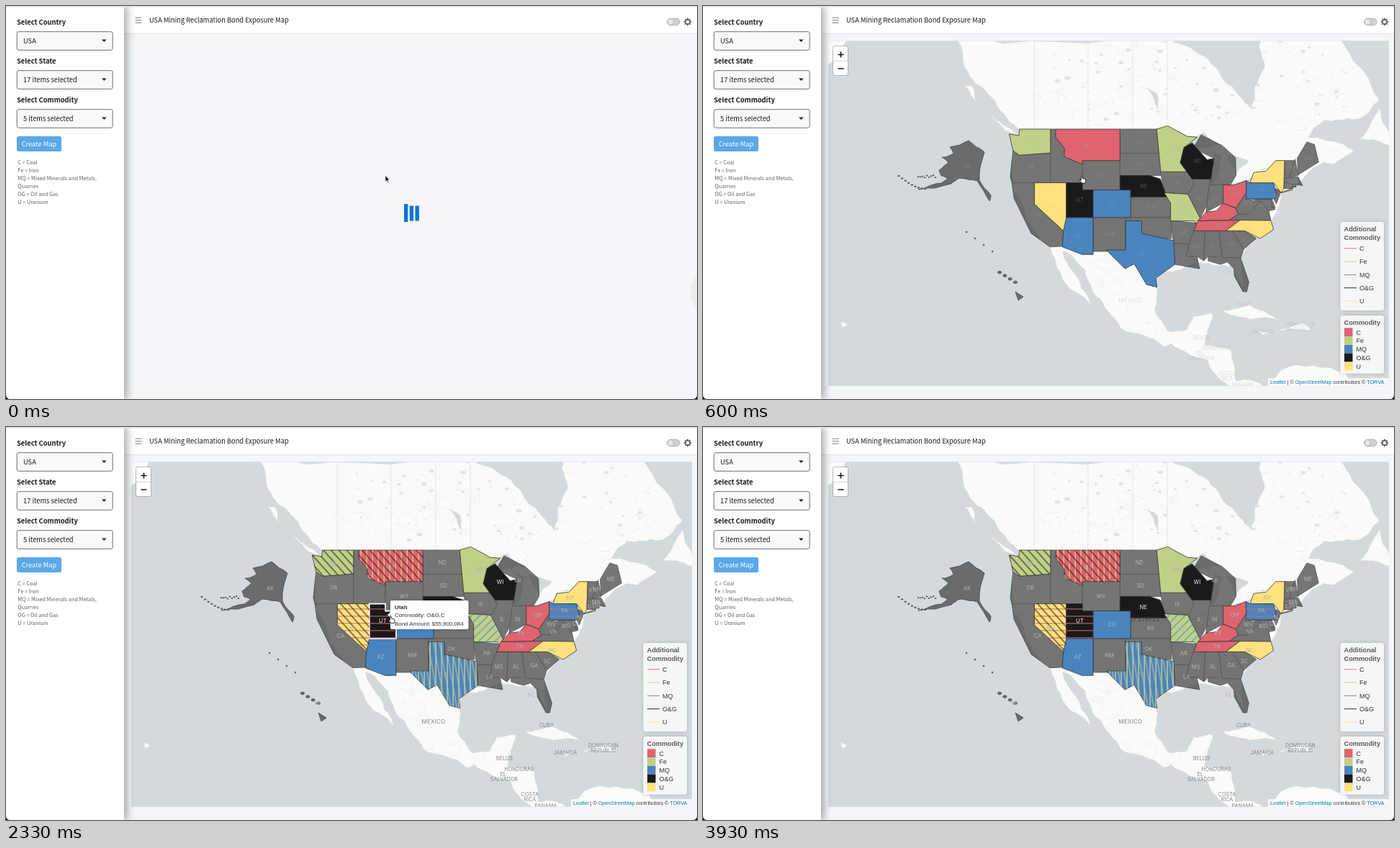
An HTML page for the animation above (4.2 s loop, 960 by 546 pixels).

```html
<!DOCTYPE html>
<html lang="en">
<head>
<meta charset="utf-8">
<title>Bond Exposure Map</title>
<style>
  html, body { margin: 0; width: 100%; height: 100%; overflow: hidden; background: #fff; }
  svg { display: block; width: 960px; height: 546px; }
  .ui { font-family: "Noto Sans CJK JP", "Noto Sans CJK SC", "Noto Sans CJK", sans-serif; font-weight: 500; fill: #16191c; }
  .leaf { font-family: "Liberation Sans", Arial, sans-serif; fill: #333; }
  .place { font-family: Inter, "Open Sans", sans-serif; text-anchor: middle; }
  .b { font-weight: 700; }
  .note { fill: #5c6064; font-weight: 400; }
  .light { fill: #fff; }
</style>
</head>
<body>
<svg id="stage" viewBox="0 0 960 546"></svg>
<script>
const TICK = 1000 / 15, TICKS = 63;
const COLORS = { C: '#de6470', Fe: '#c0d088', MQ: '#4a84bf', 'O&G': '#1a1a1a', U: '#ffe17d' };
const ANGLES = { C: 0, Fe: 80, MQ: -45, 'O&G': 48, U: 90 };

let seed = 7;
const rnd = () => (seed = seed * 16807 % 2147483647) / 2147483647;
const repeat = (n, make) => Array.from({ length: n }, (_, i) => make(i)).join('');
const each = (list, make) => list.map(make).join('');

// Web Mercator: degrees west and degrees north to stage pixels.
const merc = lat => Math.log(Math.tan(Math.PI / 4 + lat * Math.PI / 360));
const project = ([west, lat]) => [542 + (109.05 - west) * 7.45, 171 + (merc(49) - merc(lat)) * 426.9];
const pairs = s => [...s.matchAll(/([\d.]+) ([\d.]+)/g)].map(m => [+m[1], +m[2]]);
const toPath = points => 'M' + points.map(p => p.map(v => v.toFixed(1)).join(' ')).join('L') + 'Z';

// Midpoint displacement turns a few key points into a ragged coast.
function roughen(points, amount, depth = 3) {
  if (!depth) return points;
  const finer = points.flatMap(([x, y], i) => {
    const [u, v] = points[(i + 1) % points.length], k = (rnd() - .5) * 2 * amount;
    return [[x, y], [(x + u) / 2 + (y - v) * k, (y + v) / 2 + (u - x) * k]];
  });
  return roughen(finer, amount, depth - 1);
}
const shape = (points, attrs = '') => `<path d="${toPath(points)}" ${attrs}/>`;
const coast = s => shape(roughen(pairs(s).map(project), .1));
const rect = (x, y, w, h, attrs = '') => `<rect x="${x}" y="${y}" width="${w}" height="${h}" ${attrs}/>`;
const dot = (x, y, rx, ry = rx) => `<ellipse cx="${x}" cy="${y}" rx="${rx}" ry="${ry}"/>`;
const text = (x, y, size, s, cls, attrs = '') =>
  `<text x="${x}" y="${y}" font-size="${size}" class="${cls}" ${attrs}>${s.replace(/&/g, '&amp;')}</text>`;

const continent = '136 60 133 56 130 54 125 50.2 122.5 48.5 124.1 46 124 41 120.2 35 117.1 32.5 97.3 26 97 28 90 30 83 29.5 81 26 81.4 31 76 36 74 40.5 70 42.5 66 44.8 64 44.6 60.5 46.3 65 47.5 69 48 66 50.1 60 50.2 55.7 52.5 62 58 64 60 78 60 77 56 79.5 51.3 82 53 87 56.3 94 58.5 95 60';
const mexico = '117.1 32.5 115 28 112 25 109.5 23 112.8 28.4 114.8 31.8 113 31.2 109.3 25.8 105.5 21 104 19 96 15.7 94.5 16.2 87.8 13.2 85.8 10 83 8 77 8 79.5 9.5 82.5 9.4 83.4 15 88.3 15.8 86.8 21.4 90.3 21 91.5 18.6 95 18.3 97.6 22 97.2 26 104 33';
const islands = ['78 7 74 11.3 62 10.7 58 7', '84.9 21.9 80 23 74.2 20.2 78 20.7', '74.4 18.4 70 19.8 68.4 18.6',
  '78.3 18.4 76.3 18.1 77.5 17.8', '59.3 47.7 55.7 51.5 53 47', '128.3 50.7 123.4 48.4 125.5 48.9',
  '133 54 131.7 54 131 52.2', '160 55.8 156 57.5 153 60 160 60', '156 20 154.9 19.5 155.8 19'];
const lakes = ['92 46.7 88.5 48.6 84.7 47 88 46.6', '87.5 42 86.5 46 85 45.7 86.5 42', '84.5 46 80 45 82.4 43',
  '83.3 41.7 79 42.8 81 41.6', '79.7 43.3 76.4 44', '97 50.5 97 53 99 53.8'];

// One state a line: name, commodities (main first, - for none), outline; two points make a box.
const states = `
WA Fe+O&G 124.7 48.4 122.9 48.2 122.8 49 117 49 117 46 122.8 45.7 124 46.3
OR - 124 46.3 122.8 45.7 117 46 117 42 124.2 42 124.5 42.8
CA - 124.2 42 120 42 120 39 114.6 35 114.7 32.6 117.1 32.5 120.6 34.6 123.8 39.8
NV U+C+O&G 120 42 114.05 42 114.05 36.2 114.6 35 120 39
ID - 117 49 116.05 49 114.4 46.6 114.4 45.5 111.05 44.5 111.05 42 117 42
MT C+U+O&G 116.05 49 104.05 49 104.05 45 111.05 45 111.05 44.5 114.4 45.5 114.4 46.6 116.05 48
WY - 111.05 45 104.05 41
ND - 104.05 49 96.8 45.95
SD - 104.05 45.95 96.45 43
UT O&G+C 114.05 42 111.05 42 111.05 41 109.05 41 109.05 37 114.05 37
CO MQ 109.05 41 102.05 37
AZ MQ 114.05 37 109.05 37 109.05 31.3 111.1 31.3 114.8 32.5 114.6 35
NM - 109.05 37 103 31.8
NE O&G 104.05 43 98.5 43 96.5 42.5 95.3 40 102.05 40 102.05 41 104.05 41
KS - 102.05 40 94.6 37
OK - 103 37 94.45 33.8
TX MQ+U+Fe 103 36.5 100 36.5 100 34.6 94.05 33.5 93.8 29.7 97.3 27.5 97.15 25.95 99.1 26.4 101.4 29.8 103.1 29 106.6 32 103 32
MN Fe 97.2 49 95.15 49.4 91.5 48.1 89.6 48 92.1 46.7 92.8 44.7 91.2 43.5 96.45 43.5
WI O&G 92.1 46.7 90.6 47.3 87.8 45.1 86.5 45.3 87.1 42.5 90.6 42.5 92.8 44.7
IA - 96.5 43.5 91.2 43.5 90.2 41.8 91.4 40.4 95.8 40.6
MO Fe+MQ 95.8 40.6 91.4 40.4 89.1 36.9 89.7 36 90.2 36.5 94.6 36.5 94.6 39.1
AR - 94.6 36.5 89.7 36.2 91.2 33 94.05 33
LA - 94.05 33 91.2 33 91.6 31 89.7 31 89.2 29 93.8 29.7
IL - 90.6 42.5 87.1 42.5 87.5 39.3 89.1 36.9 91.4 40.4 90.2 41.8
IN - 87.4 41.7 84.8 41.7 84.8 39.1 88 37.8
MI - 90.4 46.6 88.9 48.3 84.9 46.9 82.5 45.4 82.4 43 83.4 41.75 87.2 41.75 86.5 45.3
OH C 84.8 41.7 82.7 41.7 80.5 42.3 80.5 40.6 82.4 38.4 84.8 39.1
KY C 84.8 39.1 82.5 38.4 82 37.5 83.7 36.6 89.5 36.5 88 37.8 86 38
TN C 89.5 36.5 81.7 36.6 84.3 35 90.3 35
WV - 80.5 40.6 79.5 39.5 77.8 39.4 80.3 37.5 82 37.5 82.4 38.4
VA - 83.7 36.6 75.9 36.55 76.3 38 77.8 39.4 80.3 37.5 82 37.5
NC U 81.7 36.6 75.9 36.55 75.4 35.2 77.9 33.8 80.8 35 84.3 35
SC - 83.1 35 80.8 35 78.6 33.85 81 32.1
GA - 85.6 35 83.1 35 81 32.1 81.5 30.7 85 30.8
AL - 88.2 35 85.6 35 85 31 87.6 31 88.4 30.3
MS - 90.3 35 88.2 35 88.4 30.3 89.7 31 91.6 31 91.2 33
FL - 87.6 31 81.5 30.7 80 26.8 80.4 25.2 81.1 25.2 82.7 27.8 82.8 29 84 30.1 85.3 29.7 87.6 30.3
MD - 79.5 39.72 75.8 39.72 75.1 38.2 76.3 38 77.8 39.4
DE - 75.8 39.8 75.1 38.5 75.7 38.5
NJ - 75.4 39.8 75 41.2 74 40.8 74.9 39
PA MQ+C 80.5 42.3 79.8 42 75.4 42 74.8 40.2 75.4 39.72 80.5 39.72
NY U 79.8 42 79.1 43.4 76.8 43.6 75 45 73.35 45 73.5 41.1 74 40.6 75.4 42
LI U 74 40.6 72 41.2 71.9 41
CT - 73.5 42.05 71.8 41.2
RI - 71.8 42 71.2 41.4
MA - 73.4 42.7 70.8 42.8 70 41.6 73.5 42.05
VT - 73.4 45 71.5 45 72.5 42.7 73.3 42.7
NH - 71.4 45.2 70.8 43 72.5 42.7
ME - 71 45.3 70.8 43.1 67 44.8 67.8 47.1 69.2 47.4`.trim().split('\n').map(row => {
  const [, name, kinds, outline] = row.match(/(\S+) (\S+) (.*)/);
  let points = pairs(outline).map(project);
  if (points.length === 2) {
    const [[l, t], [r, b]] = points;
    points = [[l, t], [r, t], [r, b], [l, b]];
  }
  const [main, ...extras] = kinds.split('+');
  return { name, main, extras, points, color: COLORS[main] };
});
const coloured = states.filter(s => s.color), grey = states.filter(s => !s.color);
const fillState = s => shape(s.points, s.color ? `fill="${s.color}"` : '');
const middle = v => (Math.min(...v) + Math.max(...v)) / 2;

const stateLabels = each(states.filter(s => s.name !== 'LI'), s => text(
  middle(s.points.map(p => p[0])), middle(s.points.map(p => p[1])) + 2.7, 7.6, s.name, 'place',
  `fill="${s.main === 'O&G' ? '#f4f4f4' : '#b4b4b4'}"`));
const countries = [['MEXICO', 594, 412], ['CUBA', 751, 417], ['BELIZE', 693, 463], ['HONDURAS', 713, 478],
  ['EL', 691, 485], ['SALVADOR', 692, 492], ['JAMAICA', 777, 455], ['DOMINICAN', 830, 445],
  ['REPUBLIC', 830, 452], ['COSTA', 728, 513], ['RICA', 728, 520], ['PANAMA', 750, 529]];
const countryLabels = each(countries, ([s, x, y], i) => text(x, y, i ? 6.9 : 8, s, 'place', 'fill="#7d8285" letter-spacing=".2"'));

// Alaska and Hawaii stand beside the mainland, so they are set in pixels.
function outlyingStates() {
  const alaska = '391 203 369 187 343 196 348 205 332 210 341 217 328 228 331 236 340 239 331 246 299 255 345 247 357 239 381 243 398 271 400 263 384 242';
  const aleutians = repeat(9, i => dot(272 + i * 4.6, 236 + 18 * Math.sin(i / 5.2), 1.4, .7) + dot(299 + i * 3, 235 + rnd() * 4, 1, .6));
  const chain = repeat(4, i => dot(366 + i * 12, 314 + i * 9, .9));
  const hawaii = repeat(4, i => dot(412 + i * 7.3, 370 + i * 4.6, 2.6, 1.8)) + shape(pairs('434 397 445 404 438 409'));
  return shape(roughen(pairs(alaska), .08, 2)) + aleutians + chain + hawaii + text(367, 227, 7.6, 'AK', 'place', 'fill="none" stroke="none"');
}

const roads = () => repeat(90, i => {
  const [x, y] = project(i < 50 ? [62 + rnd() * 60, 47 + rnd() * 9] : [84 + rnd() * 26, 14 + rnd() * 16]);
  return `<path d="M${x} ${y}${repeat(4, () => `l${rnd() * 18 - 5} ${rnd() * 16 - 8}`)}"/>`;
});
const ponds = () => repeat(160, () => {
  const [x, y] = project([62 + 55 * rnd(), 50 + rnd() * 9]), r = .5 + 2.2 * rnd() ** 3;
  return dot(x, y, r * 1.6, r);
});
const provinces = () => each([120, 110, 101.7, 95.2], west => {
  const [x, y] = project([west, 49]);
  return `<path d="M${x} ${y}V48"/>`;
});

const patternId = c => 'hatch' + Object.keys(COLORS).indexOf(c);
const pattern = c => `<pattern id="${patternId(c)}" width="10" height="${c === 'C' ? 10 : 8}" patternUnits="userSpaceOnUse"
  patternTransform="rotate(${ANGLES[c]})">${rect(0, 2, 10, 1.6, `fill="${COLORS[c]}" opacity=".65"`)}</pattern>`;
const hatches = each(coloured, s => each(s.extras, c => shape(s.points, `fill="url(#${patternId(c)})"`)));
const hover = name => `<g id="hover${name}" stroke="#fff" stroke-width="1.8">${fillState(states.find(s => s.name === name))}</g>`;

function legends() {
  const panel = (y, h) => rect(885.5, y, 60.5, h, 'rx="3.5" fill="#fff" fill-opacity=".82" filter="url(#soft)"');
  const heading = (y, s) => text(890.5, y, 9.2, s, 'leaf b', 'fill-opacity=".8"');
  return panel(300, 123) + heading(313, 'Additional') + heading(325, 'Commodity') + panel(430, 80.5) + heading(443, 'Commodity') +
    each(Object.entries(COLORS), ([name, color], i) => {
      const y = 336.8 + i * 18.3, box = 447.3 + i * 11.8;
      return rect(891, y - .5, 17, .9, `fill="${name === 'MQ' ? '#777b8c' : color}"`) + text(912, y + 3.3, 9, name, 'leaf') +
        rect(891, box, 11.5, 11.8, `fill="${color}"`) + text(907.5, box + 9.2, 9, name, 'leaf');
    });
}

const picker = (y, label, value) => text(15, y - 10, 9.4, label, 'ui b') +
  rect(15.2, y - .3, 133, 25.6, 'rx="2.5" fill="#f8f9fa" stroke="#6c6f73"') +
  text(24, y + 16, 9.3, value, 'ui') + `<path d="M133 ${y + 10.5}h6.6l-3.3 3.6z" fill="#212529"/>`;

function chrome() {
  const notes = ['C = Coal', 'Fe = Iron', 'MQ = Mixed Minerals and Metals,', 'Quarries', 'OG = Oil and Gas', 'U = Uranium'];
  return rect(164, 0, 796, 38, 'fill="#fff"') + rect(164, 38, 796, 1, 'fill="#dee2e6"') +
    rect(0, 0, 164, 546, 'fill="#fff" filter="url(#side)"') + rect(0, 0, 960, 1.5, 'fill="#dfe1e2"') +
    picker(36, 'Select Country', 'USA') + picker(90, 'Select State', '17 items selected') + picker(144, 'Select Commodity', '5 items selected') +
    rect(15, 181, 62, 21, 'rx="2.5" fill="#5aa8e8"') + text(21.7, 195, 9.25, 'Create Map', 'ui light') +
    each(notes, (s, i) => text(16.3, 219.7 + i * 11.05, 7.3, s, 'ui note')) +
    '<path d="M179.5 16.3h9M179.5 19.8h9M179.5 23.3h9" stroke="#777" stroke-width="1.1"/>' +
    text(199, 23.4, 9.3, 'USA Mining Reclamation Bond Exposure Map', 'ui') +
    rect(918.5, 17.3, 17.5, 9.4, 'rx="4.7" fill="#cfd2d5" stroke="#adb1b5"') +
    '<circle cx="923.3" cy="22" r="4.2" fill="#e6e8ea" stroke="#adb1b5" stroke-width=".8"/>' +
    `<g transform="translate(947 22)" fill="#666">${repeat(8, i => rect(-1, -5.2, 2, 2.6, `transform="rotate(${i * 45})"`))}
      <circle r="3" fill="none" stroke="#666" stroke-width="1.5"/></g>` +
    '<path d="M0 540v6h6q-6 0-6-6zM960 540v6h-6q6 0 6-6z"/>';
}

const zoomAndCredit = () => rect(180.5, 55.5, 21, 41, 'rx="2.5" fill="#fff" stroke="#000" stroke-opacity=".25"') + rect(181, 76, 20, .8, 'fill="#ccc"') +
  '<path d="M187.5 67.5h8M191.5 63.5v8M187.5 87h8" stroke="#111" stroke-width="1.5"/>' +
  rect(785, 517, 168, 11, 'fill="#fff" fill-opacity=".8"') +
  `<text x="788" y="524.7" font-size="7.2" class="leaf"><tspan fill="#0078a8">Leaflet</tspan> | © <tspan fill="#0078a8">OpenStreetMap</tspan> contributors © <tspan fill="#0078a8">TORVA</tspan></text>`;

const land = each([continent, mexico, ...islands], coast);
const stage = document.getElementById('stage');
stage.innerHTML = `<defs>
  <clipPath id="frame">${rect(174, 48.5, 779, 479)}</clipPath>
  <clipPath id="coast">${land}</clipPath>
  <filter id="soft" x="-20%" y="-20%" width="140%" height="140%"><feDropShadow dx="0" dy="0" stdDeviation="2.6" flood-opacity=".25"/></filter>
  <filter id="side" x="-20%" width="140%"><feDropShadow dx="4" dy="0" stdDeviation="6" flood-opacity=".36"/></filter>
  ${each(Object.keys(COLORS), pattern)}</defs>
  ${rect(0, 0, 960, 546, 'fill="#f4f6f9"')}
  <g id="loader" fill="#0a73d9">${rect(553, 275, 5.3, 25)}${rect(560.8, 277.5, 5.3, 21)}${rect(568.6, 277.5, 5.3, 21)}
    <g fill="#eceeee">${dot(985, 398, 34, 36)}</g></g>
  <g id="map" clip-path="url(#frame)">
    ${rect(174, 48, 779, 480, 'fill="#ddd"')}
    <g id="tiles">${rect(174, 48, 779, 480, 'fill="#d4dadc"')}
      <g fill="#fafaf8">${land}</g>
      <g clip-path="url(#coast)"><g fill="none" stroke="#efeeec" stroke-width=".8">${roads()}</g>
        <g stroke="#e4e5e5" stroke-width=".9">${provinces()}</g><g fill="#dfe4e5">${ponds()}</g></g>
      <g fill="#d4dadc">${each(lakes, coast)}</g></g>
    <g opacity=".7" fill="#3c3c3c" stroke="#0c0c0c" stroke-width=".8" stroke-linejoin="round">${each(grey, fillState)}${outlyingStates()}</g>
    <g stroke="#333" stroke-width=".8" stroke-linejoin="round">${each(coloured, fillState)}</g>
    ${hover('UT')}${hover('CO')}
    <g id="hatches">${hatches}</g>
    <g id="names">${stateLabels}${text(367, 227, 7.6, 'AK', 'place', 'fill="#b4b4b4"')}${text(432, 386, 7.6, 'HI', 'place', 'fill="#b4b4b4"')}
      ${text(615, 270, 7.6, 'D STATES', 'place', 'fill="#3c3c3c" letter-spacing=".4"')}${countryLabels}</g>
    ${legends()}${zoomAndCredit()}
  </g>
  <g id="tip"><rect width="108.5" height="40" y="-20" rx="2" fill="#fff" filter="url(#soft)"/><path d="M0-4l-4 4 4 4z" fill="#fff"/>
    ${repeat(3, i => text(6, -8.3 + i * 11.65, 7.9, '', i ? 'leaf' : 'leaf b'))}</g>
  ${chrome()}
  <path id="arrow" d="M527 235.5v8.6l2-1.8 1.3 3 1.3-.6-1.3-2.9h2.6z" stroke="#fff" stroke-width=".6"/>
  <path id="hand" d="M-.9.5q.9-1.2 1.8 0l.3 3 1.6.2 1.5.5 1.4.7q.6 1.6-.4 4l-.3 1.2h-4.6l-2.6-3.3q-.9-1.6.4-1.5l1.2.9z" fill="#fff" stroke="#000" stroke-width=".8"/>`;

const el = Object.fromEntries([...stage.querySelectorAll('[id]')].map(n => [n.id, n]));
const tipLines = el.tip.querySelectorAll('text');
const tips = {
  UT: ['Utah', 'Commodity: O&G,C', 'Bond Amount: $55,900,084'],
  CO: ['Colorado', 'Commodity: MQ', 'Bond Amount: $23,432,300']
};

const ramp = (tick, from, to) => Math.min(1, Math.max(0, (tick - from) / (to - from)));
// Pointer moves: [first tick, last tick, dx, dy], added to the resting place.
const moves = [[20, 21, -.5, 12], [21, 28, 5, 13], [34, 40, 22, 9], [53, 59, 27, -254]];
const pointer = tick => moves.reduce(([x, y], [from, to, dx, dy]) => {
  const p = ramp(tick, from, to);
  return [x + dx * p, y + dy * p];
}, [526, 236]);
const show = (node, on) => node.setAttribute('visibility', on ? 'visible' : 'hidden');
const fade = (node, opacity) => node.setAttribute('opacity', opacity);
const move = (node, x, y) => node.setAttribute('transform', `translate(${x} ${y})`);

function draw(tick) {
  const loaded = tick >= 3;
  const active = tick >= 22 && tick < 38 ? 'UT' : tick >= 38 && tick < 55 ? 'CO' : '';
  show(el.loader, !loaded);
  show(el.arrow, !loaded);
  show(el.map, loaded);
  fade(el.tiles, Math.max(.05, ramp(tick, 3, 7)));
  fade(el.names, ramp(tick, 8, 12));
  fade(el.hatches, tick >= 10 ? 1 : 0);
  fade(el.hoverUT, active === 'UT' ? 1 : 0);
  fade(el.hoverCO, active === 'CO' ? 1 : 0);
  show(el.hand, loaded && tick < 58);
  move(el.hand, ...pointer(tick));
  show(el.tip, active);
  if (active) {
    const [x, y] = pointer(tick - 1);
    move(el.tip, x + 3.5, y);
    tipLines.forEach((n, i) => { n.textContent = tips[active][i]; });
  }
}

const start = performance.now();
let last = -1;
function loop() {
  const tick = Math.floor((performance.now() - start + 4) / TICK) % TICKS;
  if (tick !== last) draw(last = tick);
  requestAnimationFrame(loop);
}
loop();
</script>
</body>
</html>
```
